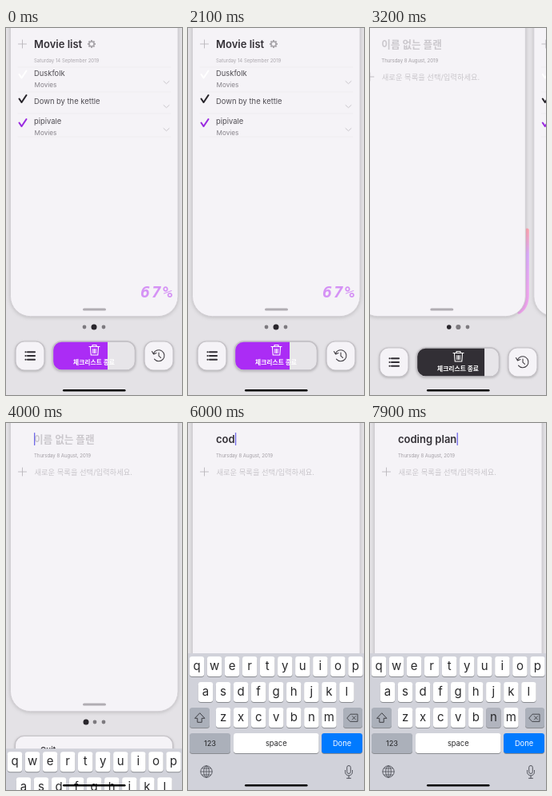
Write an HTML page that moves like this. It is 220 px wide and 459 px high and loops after 8000 ms.

```html
<!DOCTYPE html>
<html lang="ko">
<head>
<meta charset="utf-8">
<title>Checklist planner</title>
<style>
html, body { margin: 0; width: 100%; height: 100%; overflow: hidden; background: #e4e2e6; }
svg { display: block; width: 100vw; height: 100vh; font-family: Inter, "Noto Sans CJK KR", "Noto Sans CJK", sans-serif; }
.card { fill: #f5f3f7; stroke: #d2cfd4; filter: drop-shadow(0 1px 2px #8886); }
.soft { fill: #f5f3f7; stroke: #c4c1c6; stroke-width: 1.2; filter: drop-shadow(0 1px 1.5px #7777); }
.line { fill: none; stroke-linecap: round; stroke-linejoin: round; }
.key { filter: drop-shadow(0 1px 0 #898b90); }
</style>
</head>
<body>
<svg viewBox="0 0 220 459">
  <defs>
    <linearGradient id="tint" x1="0" y1="0" x2="0" y2="1">
      <stop offset="0" stop-color="#ffa3b3"/><stop offset=".3" stop-color="#dcaaff"/>
      <stop offset=".75" stop-color="#f3a6f4"/><stop offset="1" stop-color="#f0a0ee"/>
    </linearGradient>
    <clipPath id="pill"><rect x="58.5" y="392" width="103" height="36" rx="11"/></clipPath>
  </defs>
  <rect width="220" height="459" fill="#e4e2e6"/>
  <g id="movies"></g>
  <g id="plan"></g>
  <g id="dots"></g>
  <g id="buttons"></g>
  <g id="panel"></g>
  <g id="keyboard"></g>
  <rect x="71" y="452" width="78.5" height="2.4" rx="1.2" fill="#000"/>
</svg>
<script>
const LOOP = 8000, PITCH = 220;
const WORD = 'coding plan', TYPE_START = 5300, TYPE_STEP = 250, PRESS = 140;
const $ = id => document.getElementById(id);
const ramp = (t, a, b) => Math.min(1, Math.max(0, (t - a) / (b - a)));
const mix = (a, b, p) => a + (b - a) * p;

const text = (x, y, size, fill, str, more = '') =>
  `<text x="${x}" y="${y}" font-size="${size}" fill="${fill}" ${more}>${str}</text>`;
const rect = (x, y, w, h, r, more) =>
  `<rect x="${x}" y="${y}" width="${w}" height="${h}" rx="${r}" ${more}/>`;
const line = (d, color, width = 1) =>
  `<path class="line" d="${d}" stroke="${color}" stroke-width="${width}"/>`;
const plus = y => line(`M15.5 ${y}h10M20.5 ${y - 5}v10`, '#b9b6bb', .9);
const card = rect(5.5, -40, 209.5, 400.7, 25, 'class="card"');
const handle = rect(96, 350.4, 29, 3.2, 1.6, 'fill="#b1adb3"');
const bold = 'font-weight="600"', middle = 'text-anchor="middle"';

function item(y, name, color, tagged, checkY, chevronY) {
  return line(`M16.5 ${checkY}l3 4.5l6-9`, color, 2.1)
    + text(35, y, 9.4, '#504d53', name)
    + (tagged ? text(35.5, y + 14, 8.2, '#858188', 'Movies') : '')
    + line(`M197 ${chevronY - 1.5}l3.5 3.2l3.5-3.2`, '#c5c2c7', .9);
}

function gear(x, y) {
  let teeth = '';
  for (let i = 0; i < 8; i++)
    teeth += `<rect x="-1" y="-5" width="2" height="2.5" fill="#aaa7ac" transform="rotate(${i * 45})"/>`;
  return `<g transform="translate(${x} ${y})">${teeth}<circle r="3" fill="none" stroke="#aaa7ac" stroke-width="1.5"/></g>`;
}

$('movies').innerHTML = card + plus(20)
  + text(35, 25, 13, '#333036', 'Movie list', bold) + gear(107, 20)
  + text(35, 43, 6, '#aaa6ac', 'Saturday 14 September 2019')
  + [49, 80, 107, 136].map(y => line(`M15 ${y}H206`, '#ebe8ed', .7)).join('')
  + item(60, 'Duskfolk', '#fff', true, 58, 68)
  + item(95, 'Down by the kettle', '#29262c', false, 88.5, 98)
  + item(120, 'pipivale', '#9a2be0', true, 118.5, 127)
  + text(168, 337, 20, '#d592f5', '67%', 'font-family="DejaVu Sans Mono, monospace" font-style="italic" font-weight="700" letter-spacing="2"')
  + handle;

$('plan').innerHTML =
  '<path id="glow" class="line" d="M217 253V333Q217 349 207 355" stroke="url(#tint)" stroke-width="5"/>'
  + card + text(35, 24.5, 12.6, '#cbc8cd', '이름 없는 플랜', 'id="empty" font-weight="700"')
  + text(35, 25, 13, '#333036', '', `id="title" ${bold} xml:space="preserve"`)
  + rect(35, 12, 1.3, 16, .6, 'id="caret" fill="#6f68e8"')
  + text(35, 43, 6, '#a29ea4', 'Thursday 8 August, 2019')
  + plus(61) + text(35.5, 64.5, 9.3, '#c9c6cb', '새로운 목록을 선택/입력하세요.') + handle;

$('dots').innerHTML = '<circle cy="374"/>'.repeat(3);

$('buttons').innerHTML =
  rect(12, 392, 36, 36, 11, 'class="soft"')
  + [405.2, 410, 414.8].map(y => line(`M24.5 ${y}h.2M27 ${y}h9`, '#302d33', 2.1)).join('')
  + rect(58.5, 392, 103, 36, 11, 'class="soft" style="fill:#e7e5e9"')
  + `<g clip-path="url(#pill)">${rect(58, 391, 69, 38, 0, 'id="fill"')}</g>`
  + rect(58.5, 392, 103, 36, 11, 'fill="none" stroke="#c4c1c6" stroke-width="1.4"')
  + line('M104 398.5h13M108 398.5v-2h5v2M105.5 399l.7 10h8.6l.7-10M108.8 401.5v5M110.5 401.5v5M112.2 401.5v5', '#fff', 1.1)
  + text(110, 421.3, 7.8, '#fff', '체크리스트 종료', `font-weight="700" ${middle}`)
  + rect(173, 392, 36, 36, 11, 'class="soft"')
  + line('M184.5 407a7 7 0 1 1 1 7.2M182.5 404.5l2 3.5l3.4-1.6M191 406v4.2l2.5 2.2', '#403d43', 1.1);

$('panel').innerHTML = rect(11.5, 391.5, 197, 80, 11, 'class="soft"')
  + text(43, 412, 9.5, '#302d33', 'Quit', bold);

function key(x, y, w, label, size = 15, fill = '#fff', ink = '#29292b') {
  return `<rect class="key" data-key="${label}" x="${x}" y="${y}" width="${w}" height="25" rx="3.4" fill="${fill}"/>`
    + text(x + w / 2, y + (size > 10 ? 17 : 15.6), size, ink, label, middle);
}
const row = (letters, x, y) => [...letters].map((c, i) => key(x + i * 22.05, y, 18.4, c)).join('');

$('keyboard').innerHTML = rect(0, 288, 220, 175, 0, 'fill="#d1d2da"')
  + row('qwertyuiop', 1.8, 292) + row('asdfghjkl', 12.8, 324) + row('zxcvbnm', 34.9, 356)
  + key(2, 356, 25, '', 9, '#abb0ba') + key(194, 356, 24, '', 9, '#abb0ba')
  + line('M14.5 363l-6 6.3h3.3v5h5.4v-5h3.3z', '#3c3d42')
  + line('M199 368.8l4-4.6h9v9.2h-9zM205.5 366.7l4 4.2M209.5 366.7l-4 4.2', '#3c3d42', .9)
  + key(2, 388, 51, '123', 9.3, '#abb0ba') + key(57, 388, 106.5, 'space', 9.3)
  + key(167, 388, 51, 'Done', 9.3, '#007aff', '#fff')
  + '<g fill="none" stroke="#50525a" stroke-width=".9"><circle cx="23" cy="436" r="7.2"/><ellipse cx="23" cy="436" rx="3.3" ry="7.2"/></g>'
  + line('M16 436h14M23 429v14M17.5 432h11M17.5 440h11', '#50525a', .8)
  + rect(198.7, 428.5, 4.6, 10, 2.3, 'fill="none" stroke="#50525a"')
  + line('M196.5 434.5v2a4.5 4.5 0 0 0 9 0v-2M201 441.2v3M198.5 444.3h5', '#50525a');

const keyCaps = {};
document.querySelectorAll('[data-key]').forEach(k => keyCaps[k.dataset.key] = k);
const dots = [...$('dots').children];
let pressed = null;

function drawTitle(t) {
  const count = Math.max(0, Math.min(WORD.length, Math.floor((t - TYPE_START) / TYPE_STEP) + 1));
  const title = $('title');
  title.textContent = WORD.slice(0, count);
  $('empty').setAttribute('opacity', count ? 0 : 1);
  $('caret').setAttribute('x', count ? 35.3 + title.getComputedTextLength() : 35);
  const blink = count || (t - 3950) % 1000 < 550;
  $('caret').setAttribute('opacity', t >= 3950 && blink ? 1 : 0);

  if (pressed) pressed.setAttribute('fill', '#fff');
  const letter = WORD[count - 1];
  const held = count && t - TYPE_START - (count - 1) * TYPE_STEP < PRESS;
  pressed = held ? keyCaps[letter === ' ' ? 'space' : letter] : null;
  if (pressed) pressed.setAttribute('fill', '#b1b4be');
}

function drawDots(t) {
  const active = t < 3080 ? 1 : 0;
  const p = ramp(t, 3080, 3400);
  const radii = [mix(2.4, 3.5, p), mix(3.5, 2.4, p), 2.4];
  const places = [mix(98, 100, p), mix(110, 111, p), 122];
  dots.forEach((dot, i) => {
    dot.setAttribute('cx', places[i]);
    dot.setAttribute('r', radii[i]);
    dot.setAttribute('fill', i === active ? '#29262c' : '#7d7a7f');
  });
}

function draw(t) {
  const swipe = 1 - (1 - ramp(t, 2750, 3500)) ** 2.57;
  const shift = PITCH * swipe;
  $('movies').setAttribute('transform', `translate(${shift})`);
  $('plan').setAttribute('transform', `translate(${shift - PITCH})`);
  $('glow').setAttribute('opacity', ramp(t, 3000, 3100) * (1 - ramp(t, 3250, 3450)));
  drawDots(t);

  // The buttons dip while the page changes.
  const dip = 8 * Math.sin(Math.PI * ramp(t, 3000, 3400));
  $('buttons').setAttribute('transform', `translate(0 ${dip})`);
  $('fill').setAttribute('width', mix(69, 104, ramp(t, 3100, 3320)));
  $('fill').setAttribute('fill', t < 3080 ? '#ab2cf5' : '#322f35');

  const open = ramp(t, 3880, 3990);
  $('panel').setAttribute('opacity', open);
  $('buttons').setAttribute('opacity', 1 - open);
  const rise = (1 - ramp(t, 3955, 4355)) ** 3;
  $('keyboard').setAttribute('transform', `translate(0 ${172 * rise})`);
  drawTitle(t);
}

const start = performance.now();
function tick() {
  draw((performance.now() - start) % LOOP);
  requestAnimationFrame(tick);
}
tick();
</script>
</body>
</html>
```
